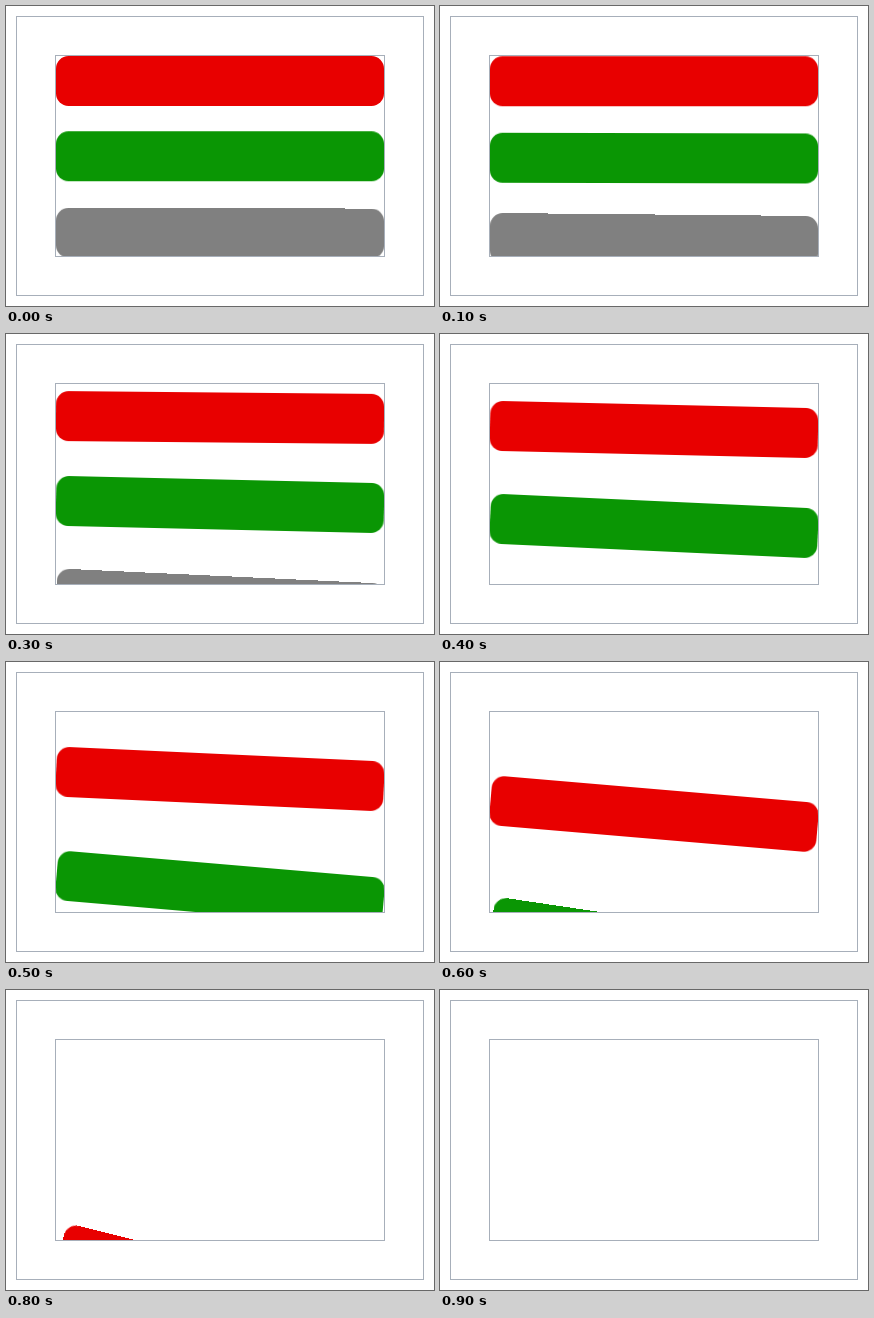
An HTML page for the animation above (1.2 s loop, 428 by 300 pixels).

```html
<!DOCTYPE html>
<html lang="en">
<head>
<meta charset="utf-8">
<title>Falling bars</title>
<style>
  html, body { margin: 0; width: 100%; height: 100%; overflow: hidden; background: #fff; }
  .outer, .inner { position: absolute; box-sizing: border-box; border: 1px solid #a7afba; }
  .outer { left: 10px; top: 10px; width: 408px; height: 280px; }
  .inner { left: 49px; top: 49px; width: 330px; height: 202px; overflow: hidden; }
  .bar { position: absolute; left: 0; width: 328px; height: 50px; border-radius: 12.5px; }
</style>
</head>
<body>
<div class="outer"></div>
<div class="inner" id="box"></div>
<script>
const LOOP = 1200, STEP = 100, STEPS = 10;
const COLORS = ['#e80000', '#0a9604', '#808080'];

// Drop in px at each step of the fall; the tilt grows with the drop.
const DROP = [0, 0.3, 2.2, 8.5, 20.5, 42, 77, 133.3, 222, 360];
const PX_PER_DEG = 15.8;

function pose(step) {
  const y = DROP[Math.min(step, DROP.length - 1)];
  return `translateY(${y}px) rotate(${y / PX_PER_DEG}deg)`;
}

// Lower bars run one step ahead of the bar above.
COLORS.forEach((color, lead) => {
  const bar = document.createElement('div');
  bar.className = 'bar';
  bar.style.top = `${lead * 75}px`;
  bar.style.background = color;
  document.getElementById('box').append(bar);

  const frames = Array.from({ length: STEPS }, (_, i) => ({
    offset: i * STEP / LOOP,
    transform: pose(i + lead),
    easing: 'step-end'
  }));
  frames.push({ offset: 1, transform: pose(STEPS) });
  bar.animate(frames, { duration: LOOP, iterations: Infinity });
});
</script>
</body>
</html>
```
